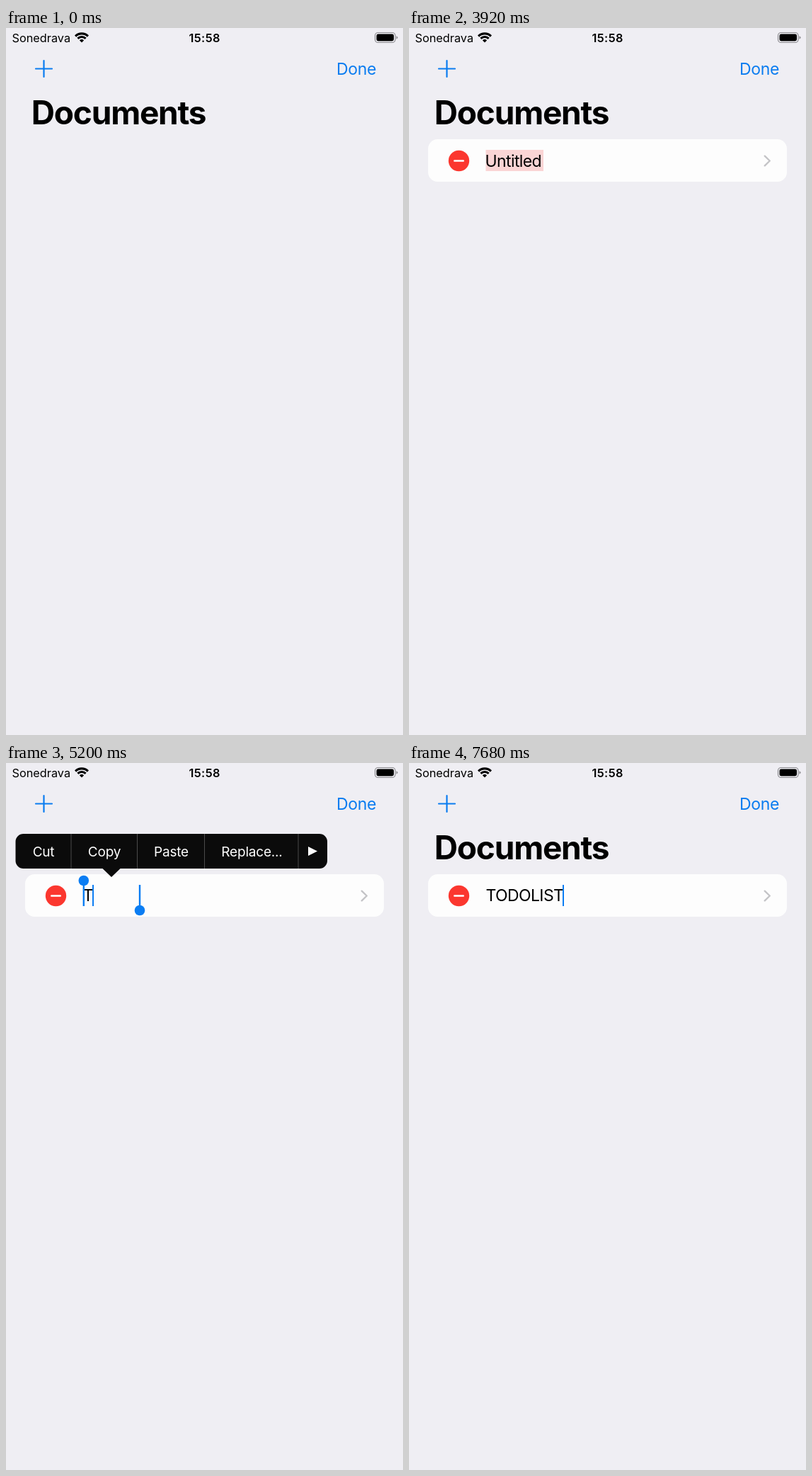
An HTML page for the animation above (8 s loop, 561x998 px).

```html
<!DOCTYPE html>
<html lang="en">
<head>
<meta charset="utf-8">
<title>Documents</title>
<style>
  html, body { margin: 0; width: 100%; height: 100%; overflow: hidden; background: #efeef3; }
  body { position: relative; font-family: Inter, "Liberation Sans", sans-serif; font-optical-sizing: none; }
  svg { position: absolute; left: 0; top: 0; width: 561px; height: 998px; display: block; }

  .status { font-size: 16.3px; }
  .clock { font-weight: 600; letter-spacing: .4px; }
  .title { font-size: 46px; font-weight: 700; letter-spacing: -1.2px; }
  .body { font-size: 23px; letter-spacing: -.62px; }
  .done { font-size: 23px; letter-spacing: -.3px; }
  .menu text { font-size: 19px; letter-spacing: -.2px; text-anchor: middle; fill: #fff; }

  .typed {
    position: absolute; left: 108.5px; top: 157px; height: 60px;
    line-height: 60px; white-space: nowrap; color: #000;
  }
  .typed b { font-weight: 400; font-size: 0; letter-spacing: 0; }
  .typed i {
    position: absolute; left: 100%; top: 15px; margin-left: -1px;
    width: 2.5px; height: 30px; background: #0b7df3;
  }

  /* One percent of the loop is one 80 ms step; every value is held. */
  .plus, .row, .old, .touch, .select, .handles, .menu, .typed b, .typed i {
    animation: 8s step-end -4ms infinite;
  }
  .plus { animation-name: press; }
  .row { animation-name: insert; }
  .old { animation-name: old; }
  .touch { animation-name: touch; }
  .select { animation-name: select; }
  .handles { animation-name: handles; }
  .menu { animation-name: menu; }
  .typed i { animation-name: caret; }
  .typed b:nth-of-type(1) { animation-name: key1; }
  .typed b:nth-of-type(2) { animation-name: key2; }
  .typed b:nth-of-type(3) { animation-name: key3; }
  .typed b:nth-of-type(4) { animation-name: key4; }
  .typed b:nth-of-type(5) { animation-name: key5; }
  .typed b:nth-of-type(6) { animation-name: key6; }
  .typed b:nth-of-type(7) { animation-name: key7; }
  .typed b:nth-of-type(8) { animation-name: key8; }

  @keyframes press {
    0% { opacity: 1; } 18% { opacity: .3; } 20% { opacity: .4; } 21% { opacity: .55; }
    22% { opacity: .7; } 23% { opacity: .85; } 24%, to { opacity: 1; }
  }
  @keyframes insert {
    0% { opacity: 0; } 20% { opacity: .08; } 21% { opacity: .25; } 22% { opacity: .48; }
    23% { opacity: .7; } 24% { opacity: .86; } 25% { opacity: .95; } 26% { opacity: .99; }
    27%, to { opacity: 1; }
  }
  @keyframes old { 0% { opacity: 1; } 63%, to { opacity: 0; } }
  @keyframes touch {
    0% { opacity: 0; } 49% { opacity: 1; } 50% { opacity: .8; } 51%, to { opacity: 0; }
  }
  @keyframes select { 0% { opacity: 0; } 51% { opacity: 1; } 63%, to { opacity: 0; } }
  @keyframes handles {
    0% { opacity: 0; } 52% { opacity: .2; } 53% { opacity: .5; } 54% { opacity: .8; }
    55% { opacity: 1; } 66% { opacity: .85; } 67% { opacity: .6; } 68% { opacity: .35; }
    69% { opacity: .15; } 70%, to { opacity: 0; }
  }
  @keyframes menu {
    0% { opacity: 0; } 53% { opacity: .15; } 54% { opacity: .6; } 55% { opacity: 1; }
    66% { opacity: .85; } 67% { opacity: .6; } 68% { opacity: .35; }
    69% { opacity: .15; } 70%, to { opacity: 0; }
  }
  @keyframes caret {
    0% { opacity: 0; } 63% { opacity: 1; }
    71% { opacity: .7; } 72% { opacity: .3; } 73% { opacity: .1; } 74% { opacity: .4; } 75% { opacity: .75; }
    76% { opacity: 1; } 81% { opacity: .75; } 82% { opacity: .4; } 83% { opacity: .1; }
    84%, to { opacity: 1; }
  }
  @keyframes key1 { 63%, to { font-size: 23px; letter-spacing: -.62px; } }
  @keyframes key2 { 76%, to { font-size: 23px; letter-spacing: -.62px; } }
  @keyframes key3 { 77%, to { font-size: 23px; letter-spacing: -.62px; } }
  @keyframes key4 { 84%, to { font-size: 23px; letter-spacing: -.62px; } }
  @keyframes key5 { 86%, to { font-size: 23px; letter-spacing: -.62px; } }
  @keyframes key6 { 89%, to { font-size: 23px; letter-spacing: -.62px; } }
  @keyframes key7 { 93%, to { font-size: 23px; letter-spacing: -.62px; } }
  @keyframes key8 { 96%, to { font-size: 23px; letter-spacing: -.62px; } }
</style>
</head>
<body>
<svg viewBox="0 0 561 998">
  <!-- status bar -->
  <text class="status" x="8.5" y="20">Sonedrava</text>
  <g fill="none" stroke="#000" stroke-width="3.1">
    <path d="M98.1 11.6A12.6 12.6 0 0 1 115.9 11.6M101.4 14.9A7.9 7.9 0 0 1 112.6 14.9"/>
    <path d="M107 20.5L103.9 17.4A4.4 4.4 0 0 1 110.1 17.4Z" fill="#000" stroke="none"/>
  </g>
  <text class="status clock" x="280.7" y="20" text-anchor="middle">15:58</text>
  <rect x="521.5" y="6.5" width="28.5" height="14" rx="4.3" fill="none" stroke="#8e8e92" stroke-width="1.2"/>
  <rect x="523.5" y="8.5" width="24.5" height="10" rx="2.4"/>
  <path d="M551.5 11.2Q553.6 12 553.6 13.5T551.5 15.8Z" fill="#8e8e92"/>

  <!-- navigation bar -->
  <path class="plus" d="M42 57.5H65M53.5 46V69" fill="none" stroke="#0a7cf0" stroke-width="2.2" stroke-linecap="round"/>
  <text class="done" x="467" y="66" fill="#0a7cf0">Done</text>
  <text class="title" x="35.8" y="136">Documents</text>

  <!-- list row -->
  <g class="row">
    <rect x="27" y="157" width="507" height="60" rx="13.5" fill="#fdfdfd"/>
    <circle cx="70.5" cy="187.5" r="14.7" fill="#fb372f"/>
    <path d="M64.3 187.5H76.7" stroke="#fff" stroke-width="2.6" stroke-linecap="round"/>
    <path d="M502.7 180.7L509.8 187.5L502.7 194.3" fill="none" stroke="#c4c4c7" stroke-width="2.4" stroke-linecap="round" stroke-linejoin="round"/>
    <rect class="touch" x="108.5" y="172" width="81.5" height="30" fill="#fad5d5"/>
    <text class="body old" x="107.6" y="196">Untitled</text>
    <rect class="select" x="108.5" y="172" width="81.5" height="30" fill="#007aff" fill-opacity=".2"/>
  </g>
</svg>

<div class="typed"><b>T</b><b>O</b><b>D</b><b>O</b><b>L</b><b>I</b><b>S</b><b>T</b><i></i></div>

<svg viewBox="0 0 561 998">
  <g class="handles" fill="#0b7df3">
    <rect x="108.6" y="172" width="2.4" height="30"/>
    <circle cx="109.8" cy="166" r="7.3"/>
    <rect x="187.8" y="172" width="2.4" height="30"/>
    <circle cx="189" cy="208" r="7.3"/>
  </g>
  <g class="menu">
    <path d="M24.5 100H443A11 11 0 0 1 454 111V138A11 11 0 0 1 443 149H161.5L149 161L136.5 149H24.5A11 11 0 0 1 13.5 138V111A11 11 0 0 1 24.5 100Z" fill="#0b0b0b"/>
    <path d="M92 100V149M185.5 100V149M280.5 100V149M413 100V149" stroke="#4a4a4a"/>
    <text x="53" y="132">Cut</text>
    <text x="139" y="132">Copy</text>
    <text x="233.5" y="132">Paste</text>
    <text x="347.5" y="132">Replace...</text>
    <path d="M427 118L440 124.5L427 131Z" fill="#fff"/>
  </g>
</svg>
</body>
</html>
```
